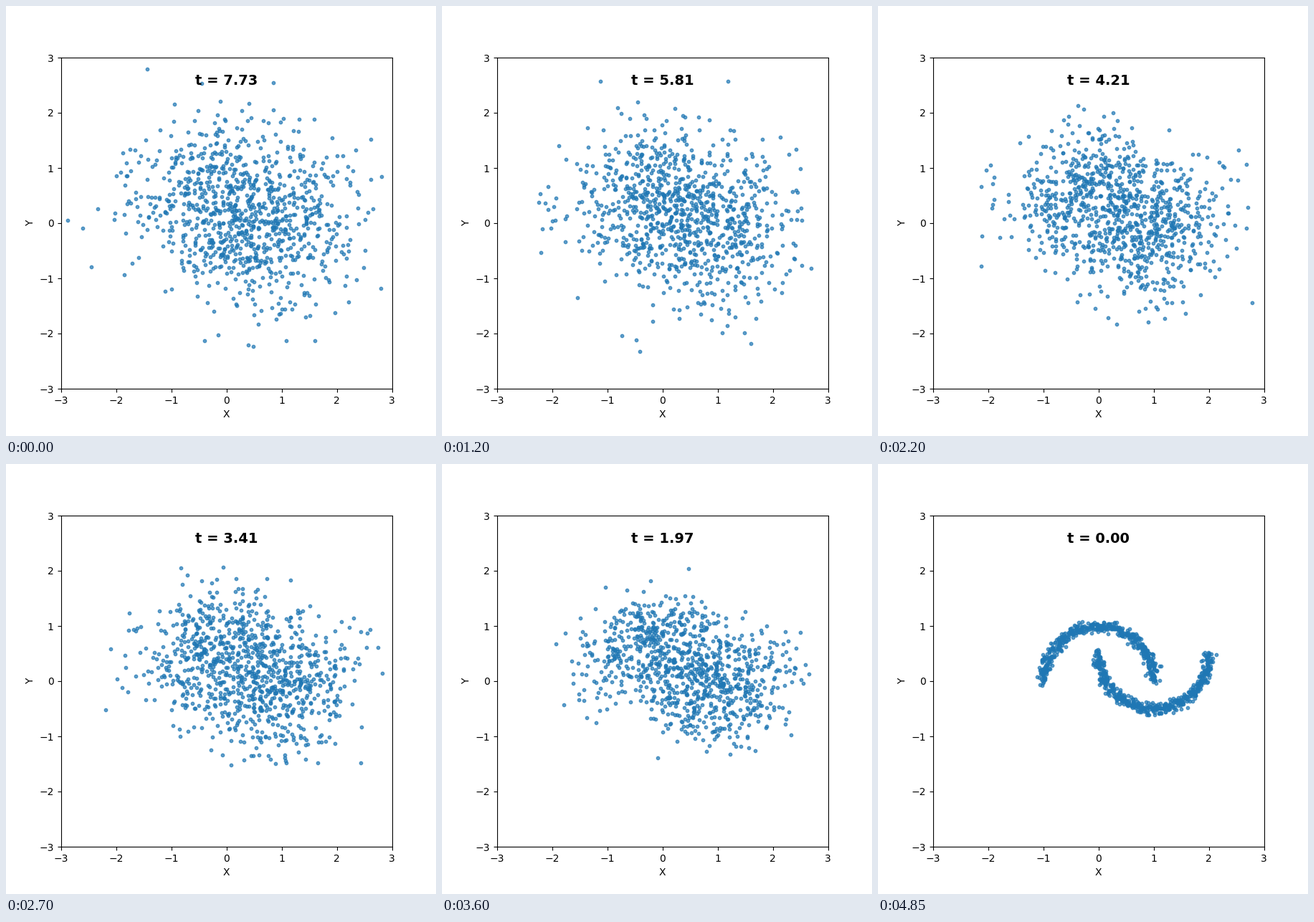
Write a matplotlib script that moves like this. It is 600 by 600 pixels and loops after 5.85 s.

```python
import numpy as np
import matplotlib.pyplot as plt
from matplotlib.animation import FuncAnimation

N = 1000            # points
BETA = 0.1          # diffusion rate
T_MAX, DT = 7.73, 0.08
MOVES, FRAMES, INTERVAL = 97, 117, 50

rng = np.random.default_rng(42)


def two_moons(n, noise):
    a = np.linspace(0, np.pi, n // 2)
    upper = np.column_stack([np.cos(a), np.sin(a)])
    lower = np.column_stack([1 - np.cos(a), 0.5 - np.sin(a)])
    pts = rng.permutation(np.vstack([upper, lower]))
    return pts + rng.normal(0, noise, pts.shape)


def diffuse(pts, times):
    """Follow an Ornstein-Uhlenbeck walk through ascending times."""
    path = [pts]
    for dt in np.diff(times):
        keep = np.exp(-BETA * dt / 2)
        kick = np.sqrt(1 - keep ** 2)
        path.append(keep * path[-1] + kick * rng.normal(size=pts.shape))
    return path


# The walk is played backwards, from noise to the two moons.
times = np.maximum(T_MAX - DT * np.arange(MOVES + 1), 0)
path = diffuse(two_moons(N, 0.05), times[::-1])[::-1]

fig, ax = plt.subplots(figsize=(6, 6), dpi=100)
ax.set(xlim=(-3, 3), ylim=(-3, 3), xlabel="X", ylabel="Y", aspect="equal")
dots = ax.scatter(*path[0].T, s=10, alpha=0.7)
label = ax.text(0.5, 0.95, "", transform=ax.transAxes, ha="center", va="top",
                fontsize=14, fontweight="bold")


def update(i):
    k = min(i, MOVES)
    dots.set_offsets(path[k])
    label.set_text(f"t = {times[k]:.2f}")
    return dots, label


anim = FuncAnimation(fig, update, frames=FRAMES, interval=INTERVAL,
                     repeat=True, repeat_delay=0)
plt.show()
```
